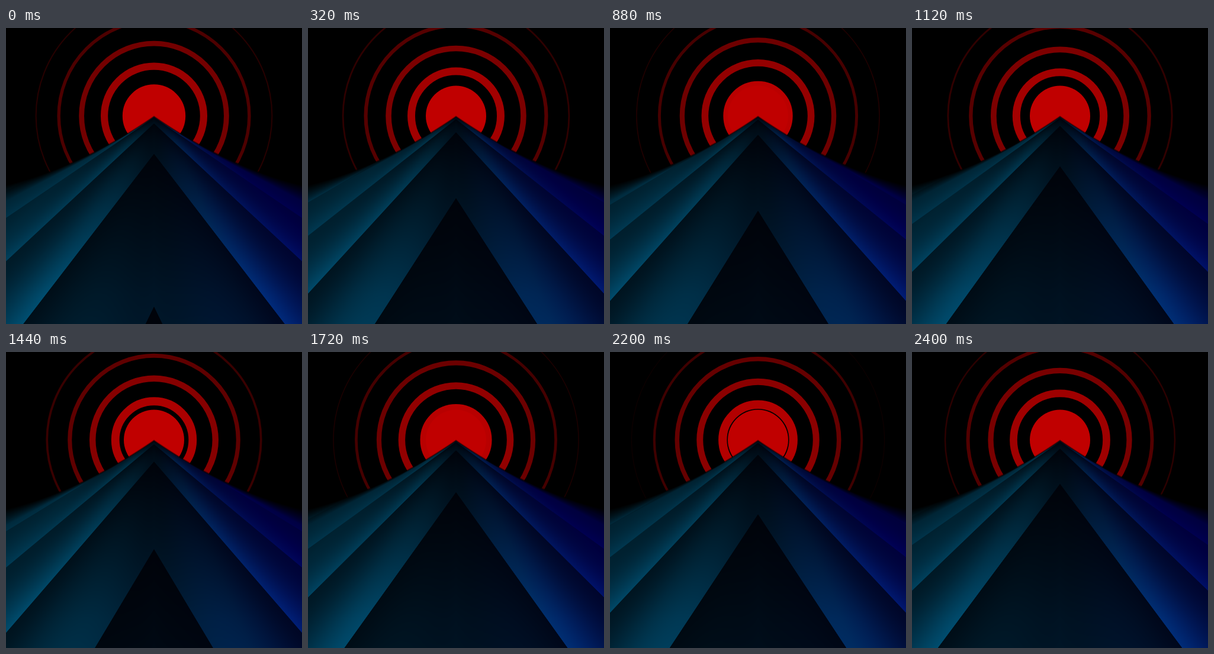
An HTML page with a canvas that plays this animation: 500 px wide and 500 px high, repeating every 2440 ms.

```html
<!DOCTYPE html>
<html lang="en">
<head>
<meta charset="utf-8">
<title>Signal ridge</title>
<style>
html, body { margin: 0; width: 100%; height: 100%; overflow: hidden; background: #000; }
canvas { display: block; width: 500px; height: 500px; }
</style>
</head>
<body>
<canvas id="stage" width="500" height="500"></canvas>
<script>
const SIZE = 500, MID = 250, TOP = 140, PEAK = 148;
const LOOP = 2440, STEP = 40;
const RING_TIME = 409.5, RING_GAP = 36.8, BAND_TIME = 614;
const ROWS = SIZE - TOP;

const ctx = document.getElementById('stage').getContext('2d');
const layer = document.createElement('canvas');
layer.width = SIZE;
layer.height = ROWS;
const layerCtx = layer.getContext('2d');
const image = layerCtx.createImageData(SIZE, ROWS);
const px = image.data;

const clamp = v => Math.max(0, Math.min(1, v));
const fract = v => v - Math.floor(v);
const smooth = v => { v = clamp(v); return v * v * (3 - 2 * v); };

// Per-pixel constants of the ridge: depth, edge softness, dark and bright ends of a band
const count = SIZE * ROWS;
const make = () => new Float32Array(count);
const depth = make(), soft = make();
const darkG = make(), darkB = make(), liteG = make(), liteB = make();

// Height of a band edge of depth z; k runs from the ridge (0) to the stage border (1)
function edgeY(z, k) {
  const ridge = 322 * Math.exp(-1.616 * (z - 0.909));
  const border = 765 / z - 6 * z;
  return PEAK + ridge * (1 - k) + border * k;
}

function depthAt(y, k) {
  let near = 0.5, far = 8;
  for (let i = 0; i < 18; i++) {
    const z = (near + far) / 2;
    if (edgeY(z, k) > y) near = z; else far = z;
  }
  return (near + far) / 2;
}

function prepare() {
  for (let i = 0; i < count; i++) {
    const x = i % SIZE + 0.5, y = Math.floor(i / SIZE) + TOP + 0.5;
    const d = Math.abs(x - MID), k = d / MID;
    const crest = 149 + 0.69 * d - 0.0009 * d * d;
    const alpha = clamp((y - crest) / 3 + 0.5);
    px[i * 4 + 3] = 255 * alpha;
    if (!alpha) continue;

    const z = depthAt(y, k);
    depth[i] = z;
    soft[i] = Math.min(0.5, 0.1 / Math.abs(edgeY(z, k) - edgeY(z + 0.1, k)));

    const angle = d / (y - 100);
    const fade = clamp((y - crest) / (2 + 26 * k * k * k));
    const glow = smooth(angle / 0.6);
    const shade = Math.pow(clamp(angle), 1.5);
    const lit = fade * (0.65 + 0.35 * clamp((y - 200) / 250))
      * (1 - 0.3 * clamp((angle - 0.5) * 1.2));

    if (x < MID) {
      darkG[i] = (3 + 30 * shade) * fade;
      darkB[i] = (10 + 38 * shade) * fade;
      liteG[i] = (22 + 58 * glow) * lit;
      liteB[i] = (40 + 75 * glow) * lit;
    } else {
      const green = clamp(1.65 - 1.6 * angle);
      darkG[i] = (3 + 15 * shade) * green * fade;
      darkB[i] = (10 + 50 * shade) * fade;
      liteG[i] = (22 + 33 * glow) * green * lit;
      liteB[i] = (40 + 85 * glow) * lit;
    }
  }
}

function drawRidge(t) {
  const phase = 0.909 + t / BAND_TIME;
  for (let i = 0; i < count; i++) {
    const o = i * 4;
    if (!px[o + 3]) continue;
    const p = fract(phase - depth[i]);
    let v = Math.pow(p, 1.3);
    if (p < soft[i]) {
      const m = p / soft[i];
      v = v * m + 1 - m;
    }
    px[o + 1] = darkG[i] + (liteG[i] - darkG[i]) * v;
    px[o + 2] = darkB[i] + (liteB[i] - darkB[i]) * v;
  }
  layerCtx.putImageData(image, 0, 0);
  ctx.drawImage(layer, 0, TOP);
}

function circle(r) {
  ctx.beginPath();
  ctx.arc(MID, 148.5, r, 0, Math.PI * 2);
}

function drawRings(t) {
  const start = 53.2 + RING_GAP * fract(t / RING_TIME);
  for (let r = start; r < 215; r += RING_GAP) {
    const w = 12.2 - (r - 90) * 0.092;
    ctx.lineWidth = w;
    ctx.strokeStyle = `rgb(${Math.round(192 - (r - 53) * 1.04)}, 0, 0)`;
    circle(r - w / 2);
    ctx.stroke();
  }
  ctx.fillStyle = 'rgb(192, 0, 0)';
  circle(51);
  ctx.fill();
}

function draw(t) {
  ctx.fillStyle = '#000';
  ctx.fillRect(0, 0, SIZE, SIZE);
  drawRings(t);
  drawRidge(t);
}

let shown = -1;
prepare();
const begin = performance.now();
function tick() {
  const now = (performance.now() - begin) % LOOP;
  const t = Math.floor(now / STEP) * STEP;
  if (t !== shown) {
    shown = t;
    draw(t);
  }
  requestAnimationFrame(tick);
}
tick();
</script>
</body>
</html>
```
